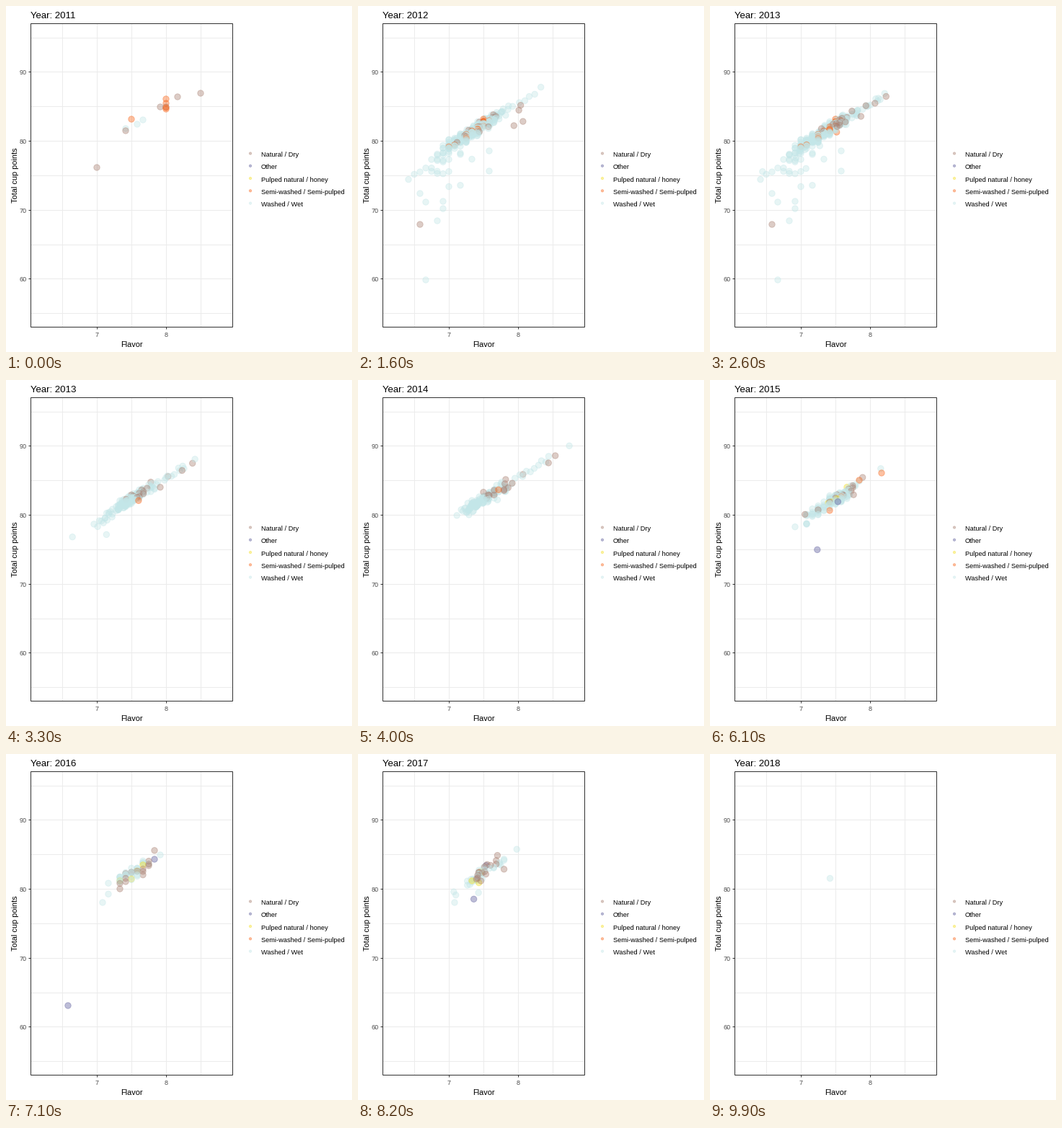
A matplotlib script for the animation above (10000 ms loop, 480 px wide and 480 px high).

```python
import numpy as np
import matplotlib.pyplot as plt
from matplotlib.animation import FuncAnimation
from matplotlib.colors import to_rgba
from matplotlib.patches import Rectangle

SIZE, DPI, FRAMES, INTERVAL = 480, 72, 100, 100
FIRST, LAST = 2011, 2018
STEP = (FRAMES - 1) / (LAST - FIRST)
LEFT, RIGHT, TOP, BOTTOM = 34, 314, 24, 445
ALPHA = 0.4

NAT, OTHER, PULP, SEMI, WASH = GROUPS = range(5)
LABELS = ["Natural / Dry", "Other", "Pulped natural / honey",
          "Semi-washed / Semi-pulped", "Washed / Wet"]
COLORS = ["#a98072", "#5c5c9b", "#f5e020", "#fa6418", "#c3e6e8"]
RGBA = np.array([to_rgba(c, ALPHA) for c in COLORS])

rng = np.random.default_rng(7)
rows = {(y, g): [] for y in range(FIRST, LAST + 1) for g in GROUPS}


def flavor_x(v):
    return 126 + 96 * (v - 7)


def score_y(v):
    return 91.4 + 9.567 * (90 - v)


def trend(x):
    """Height of the main trend in pixels."""
    return 165 - 0.62 * (x - 174)


def on_grid(x):
    """Flavor is scored in twelfths of a point, 8 px apart."""
    return 126 + 8 * np.round((x - 126) / 8)


def keep(year, group, *xy):
    rows[year, group] += xy


def band(year, group, count, mid, spread):
    """Scores scattered closely around the trend."""
    noise = 4.5 if group == WASH else 6
    z = np.clip(rng.normal(size=(count, 2)), -2.1, 2.1)
    x = on_grid(mid + spread * z[:, 0])
    keep(year, group, *zip(x, trend(x) + noise * z[:, 1]))


def tail(year, count, lo, hi, drop):
    """Weak washed lots that fall below the trend."""
    x = on_grid(rng.uniform(lo, hi, count))
    keep(year, WASH, *zip(x, trend(x) + rng.exponential(drop, count)))


def leaders(year, count, lo, hi):
    """The best washed lots, spaced along the upper trend."""
    x = np.linspace(lo, hi, count)
    keep(year, WASH, *zip(x, trend(x) + rng.uniform(-4, 4, count)))


keep(2011, NAT, (270, 121), (238, 126), (214, 140), (222, 140), (166, 173), (126, 224))
keep(2011, SEMI, (222, 129), (222, 135), (222, 141), (222, 143), (174, 157))
keep(2011, WASH, (190, 158), (182, 164), (166, 170))

band(2012, WASH, 210, 164, 22)
leaders(2012, 5, 222, 256)
tail(2012, 34, 70, 162, 17)
keep(2012, WASH, (182, 201), (182, 229), (94, 272), (118, 271), (110, 298), (94, 380))
band(2012, NAT, 13, 188, 24)
keep(2012, NAT, (238, 161), (222, 167), (86, 303))
band(2012, SEMI, 20, 176, 24)

band(2013, WASH, 115, 173, 17)
leaders(2013, 10, 214, 240)
tail(2013, 10, 102, 150, 8)
keep(2013, WASH, (129, 234), (60, 239))
band(2013, NAT, 13, 196, 18)
keep(2013, NAT, (248, 123), (230, 133))
keep(2013, SEMI, (176, 178))

band(2014, WASH, 150, 170, 17)
leaders(2014, 11, 214, 270)
tail(2014, 18, 102, 198, 16)
keep(2014, WASH, (302, 86), (134, 253), (142, 250), (126, 276), (78, 203),
     (78, 272), (78, 289), (62, 291), (46, 291))
band(2014, NAT, 17, 186, 24)
keep(2014, NAT, (278, 102), (270, 112), (126, 206), (110, 225))
keep(2014, OTHER, (190, 152), (182, 158))
keep(2014, SEMI, (198, 148), (150, 160), (178, 168))

band(2015, WASH, 90, 173, 18)
keep(2015, WASH, (246, 116))
tail(2015, 6, 118, 158, 6)
band(2015, NAT, 11, 188, 14)
keep(2015, NAT, (134, 185), (118, 192))
keep(2015, OTHER, (174, 190), (166, 178))
band(2015, PULP, 4, 186, 12)
keep(2015, SEMI, (238, 129), (207, 139), (182, 162), (166, 181))

band(2016, WASH, 29, 170, 15)
keep(2016, WASH, (214, 140), (134, 206))
band(2016, NAT, 16, 178, 12)
keep(2016, OTHER, (206, 146), (86, 349))
band(2016, PULP, 4, 174, 10)

band(2017, WASH, 26, 172, 19)
keep(2017, WASH, (222, 130), (174, 196), (134, 196), (126, 195))
band(2017, NAT, 15, 178, 14)
keep(2017, NAT, (206, 159))
keep(2017, OTHER, (170, 157), (181, 161))
band(2017, PULP, 3, 164, 6)

keep(2018, WASH, (166, 172))


def ranked(data):
    """Best score first."""
    return np.array(sorted(data, key=lambda p: p[1]), float).reshape(-1, 2)


states = {k: ranked(v) for k, v in rows.items()}
KEYS = [round(STEP * j) for j in range(LAST - FIRST + 1)]


def blend(frame):
    """Equal ranks move together; rows without a partner wait for the next year."""
    j = max(i for i, k in enumerate(KEYS) if k <= frame)
    year = FIRST + j
    after = min(year + 1, LAST)
    t = (frame - KEYS[j]) / (KEYS[j + 1] - KEYS[j]) if year < LAST else 0
    pos, depth, group = [], [], []
    for g in GROUPS:
        start, end = states[year, g], states[after, g]
        n = min(len(start), len(end))
        cur = start.copy()
        cur[:n] += t * (end[:n] - start[:n])
        pos.append(cur)
        depth.append(start[:, 1])
        group += [g] * len(cur)
    order = np.argsort(np.concatenate(depth), kind="stable")
    return np.concatenate(pos)[order], np.array(group)[order]


plt.rcParams["font.family"] = "Liberation Sans"
fig = plt.figure(figsize=(SIZE / DPI, SIZE / DPI), dpi=DPI, facecolor="white")
ax = fig.add_axes([0, 0, 1, 1])
ax.set(xlim=(0, SIZE), ylim=(SIZE, 0))
ax.axis("off")


def line(x, y, color, z):
    ax.plot(x, y, color=color, lw=1, zorder=z, solid_capstyle="butt")


def label(x, y, text, size, color="black", **kw):
    return ax.text(x, y, text, fontsize=size, color=color, **kw)


for v in (6.5, 7, 7.5, 8, 8.5):
    line([flavor_x(v)] * 2, [TOP, BOTTOM], "#ebebeb", 0)
for v in range(55, 100, 5):
    line([LEFT, RIGHT], [score_y(v)] * 2, "#ebebeb", 0)
for v in (7, 8):
    line([flavor_x(v)] * 2, [BOTTOM, BOTTOM + 3], "#333333", 4)
    label(flavor_x(v), 459, str(v), 9, "#4d4d4d", ha="center")
for v in (60, 70, 80, 90):
    line([LEFT - 3, LEFT], [score_y(v)] * 2, "#333333", 4)
    label(29, score_y(v) + 4, str(v), 9, "#4d4d4d", ha="right")
ax.add_patch(Rectangle((LEFT, TOP), RIGHT - LEFT, BOTTOM - TOP, fill=False,
                       ec="#333333", lw=1, zorder=4))

title = label(34, 17, "", 13.2)
label(174, 473, "Flavor", 11, ha="center")
label(18, 235, "Total cup points", 11, rotation=90, ha="right", va="center")

legend_y = 204.5 + 17.28 * np.arange(5)
ax.scatter([339] * 5, legend_y, s=3.3 ** 2, c=RGBA, edgecolors=RGBA, linewidths=0.95)
for y, text in zip(legend_y, LABELS):
    label(354, y + 4.5, text, 9.3)

dots = ax.scatter([], [], s=8.4 ** 2, linewidths=0.95, zorder=3)


def draw(frame):
    pos, group = blend(frame)
    dots.set_offsets(pos)
    dots.set_facecolors(RGBA[group])
    dots.set_edgecolors(RGBA[group])
    title.set_text(f"Year: {round(FIRST + frame / STEP)}")
    return dots, title


anim = FuncAnimation(fig, draw, frames=FRAMES, interval=INTERVAL, repeat=True,
                     repeat_delay=0, init_func=lambda: draw(0))
plt.show()
```
